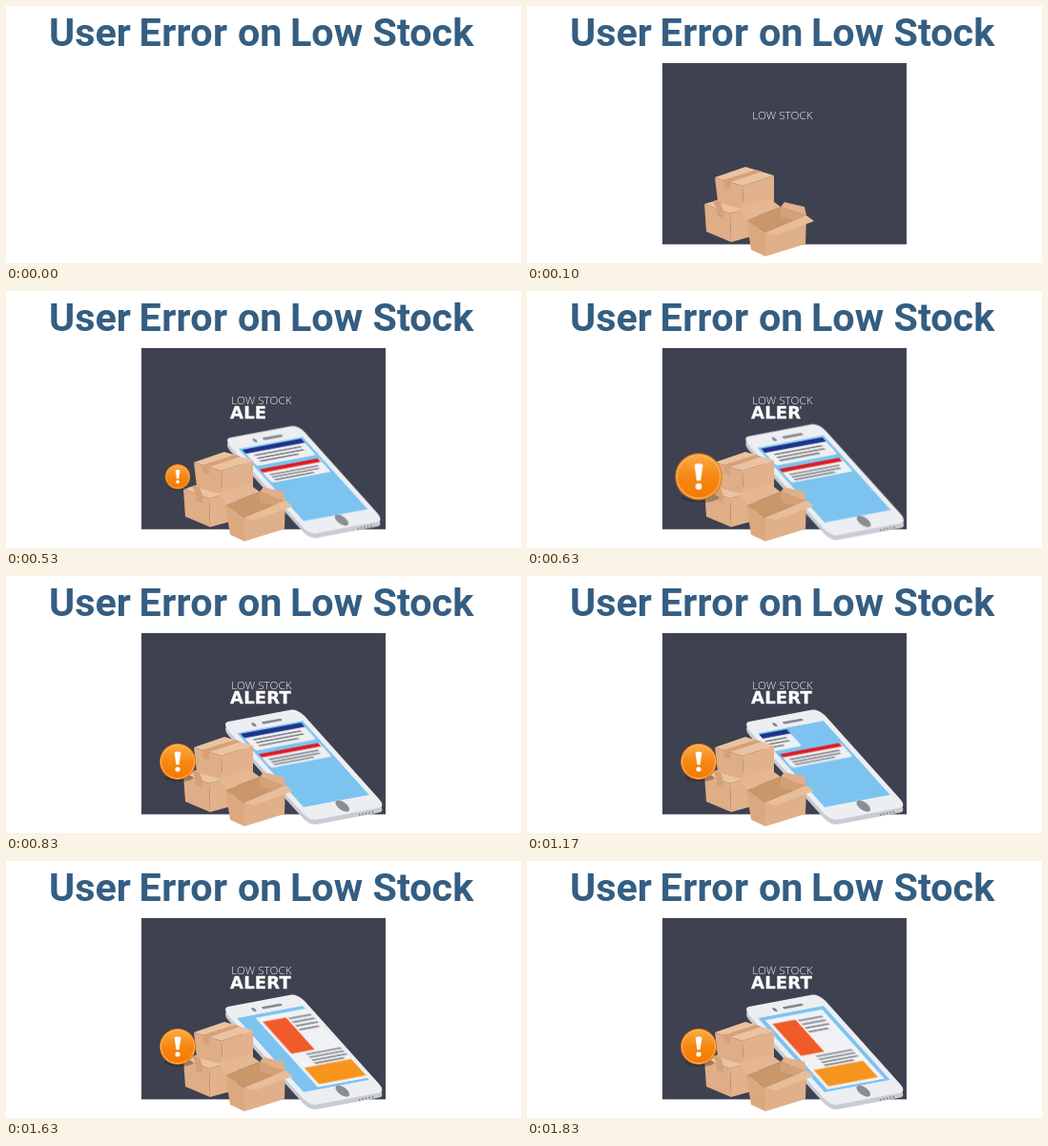
An HTML page that plays this animation: 540x270 px, repeating every 1.87 s.

```html
<!DOCTYPE html>
<html lang="en">
<head>
<meta charset="utf-8">
<title>User Error on Low Stock</title>
<style>
  html, body { margin: 0; width: 100%; height: 100%; overflow: hidden; background: #fff; }
  svg { display: block; width: 540px; height: 270px; }
  .title { font: 700 41.3px Roboto, "Open Sans", sans-serif; fill: #345e82; }
  .small { font: 300 11.7px "Open Sans", sans-serif; fill: #f0f0f4; }
  .alert { font: 700 18px "DejaVu Sans", sans-serif; fill: #fff; stroke: #fff; stroke-width: .3px; }

  .scene, .cover, .phone, .badge, .first, .second, .drop, .page {
    animation: 1870ms linear infinite;
  }
  .scene { animation-name: show; animation-timing-function: step-end; }
  .cover { animation-name: type; animation-timing-function: step-end; }
  .phone { animation-name: pop; transform-origin: 312px 198px; }
  .badge { animation-name: bounce; transform-origin: 180px 195px; }
  .first { animation-name: leave-first; }
  .second { animation-name: leave-second; }
  .drop { animation-name: drop; }
  .page { animation-name: enter; }

  @keyframes show {
    0% { visibility: hidden; }
    5.348%, 100% { visibility: visible; }
  }
  @keyframes type {
    0% { transform: translateX(0); }
    17.647% { transform: translateX(16px); }
    22.46% { transform: translateX(27.4px); }
    26.738% { transform: translateX(40px); }
    31.016% { transform: translateX(53.4px); }
    35.294%, 100% { transform: translateX(68px); }
  }
  @keyframes pop {
    0%, 14.439% { transform: scale(0); animation-timing-function: ease-out; }
    19.786% { transform: scale(1.18); }
    21.39% { transform: scale(1.19); animation-timing-function: ease-in-out; }
    28.342% { transform: scale(.977); animation-timing-function: ease-in-out; }
    34.225% { transform: scale(1.01); }
    41.176%, 100% { transform: scale(1); }
  }
  @keyframes bounce {
    0%, 25.134% { transform: scale(0); }
    28.342% { transform: scale(.68); animation-timing-function: ease-out; }
    33.69% { transform: scale(1.3); animation-timing-function: ease-in-out; }
    37.433% { transform: scale(.95); }
    41.176%, 100% { transform: scale(1); }
  }
  @keyframes drop {
    0%, 18.182% { transform: translateY(-27px); }
    19.786% { transform: translateY(-15px); }
    22.995%, 100% { transform: translateY(0); }
  }
  @keyframes leave-first {
    0%, 55.08% { transform: translateX(0); animation-timing-function: ease-in-out; }
    69.519%, 100% { transform: translateX(-100px); }
  }
  @keyframes leave-second {
    0%, 65.775% { transform: translateX(0); animation-timing-function: ease-in-out; }
    83.422%, 100% { transform: translateX(-100px); }
  }
  @keyframes enter {
    0%, 71.123% { transform: translateX(100px); animation-timing-function: cubic-bezier(.2, .4, .6, 1); }
    97.861%, 100% { transform: translateX(0); }
  }
</style>
</head>
<body>
<svg viewBox="0 0 540 270">
  <defs>
    <clipPath id="stage"><rect x="142" y="60" width="256" height="210"/></clipPath>
    <clipPath id="screen"><rect width="100" height="100"/></clipPath>
    <linearGradient id="orange" x2="0" y2="1">
      <stop offset="0" stop-color="#fbab45"/>
      <stop offset=".5" stop-color="#f68712"/>
      <stop offset="1" stop-color="#f47a00"/>
    </linearGradient>
  </defs>

  <text class="title" y="42"><tspan x="45">User</tspan> <tspan x="139.5" letter-spacing=".4">Error</tspan> <tspan x="243">on</tspan> <tspan x="298">Low</tspan> <tspan x="384.5">Stock</tspan></text>

  <g class="scene" clip-path="url(#stage)">
    <rect x="142" y="60" width="256" height="190.4" fill="#3e414f"/>
    <text class="small" x="236.2" y="119">LOW STOCK</text>
    <text class="alert" x="235" y="134" letter-spacing=".2">ALERT</text>
    <rect class="cover" x="234" y="120" width="68" height="16" fill="#3e414f"/>

    <g class="phone">
      <!-- phone face: the screen is the square 0..100 -->
      <g transform="matrix(.69 -.13 .7 .78 242 170)">
        <rect x="-8" y="-15" width="116" height="132" rx="10" fill="#c9ccd3"/>
      </g>
      <path d="M370 251L387 247.3" stroke="#82858e" stroke-width="2" stroke-dasharray="1.5 2"/>
      <g transform="matrix(.69 -.13 .7 .78 242 165)">
        <rect x="-8" y="-15" width="116" height="132" rx="10" fill="#eceef2"/>
        <circle cx="32" cy="-6" r="2.6" fill="#85878f"/>
        <path d="M46 -6H73" stroke="#85878f" stroke-width="3" stroke-linecap="round"/>
        <circle cx="52" cy="107" r="7.5" fill="#8b8d94"/>
        <g clip-path="url(#screen)">
          <rect width="100" height="100" fill="#7cc3f0"/>
          <g class="second">
            <g class="drop">
              <rect x="4" y="29" width="92" height="18.5" rx="3" fill="#eef0f3"/>
              <rect x="4" y="29" width="90" height="4.5" fill="#e0191f"/>
              <path d="M11 37.5H86M11 41H84M11 44.5H72" stroke="#77797f" stroke-width="1.6"/>
            </g>
          </g>
          <g class="first">
            <rect x="4" y="2" width="92" height="22.5" rx="3" fill="#eef0f3"/>
            <rect x="4" y="2" width="92" height="5.5" fill="#20328a"/>
            <path d="M14 11.5H86M14 15.5H86M14 19.5H74" stroke="#77797f" stroke-width="1.7"/>
          </g>
          <g class="page">
            <rect x="7" y="4" width="86" height="93" fill="#f1f2f5"/>
            <rect x="12" y="10" width="35" height="43" fill="#f15a29"/>
            <path d="M50 12H86M50 17H86M50 22H86M50 27H80M31 57H86M31 61H86M31 65H86M31 69H76" stroke="#8a8c93" stroke-width="2"/>
            <rect x="12" y="72" width="75" height="22" fill="#f7941d"/>
          </g>
        </g>
      </g>
    </g>

    <!-- lower box -->
    <path d="M186 208L206 202L243 209L213 218Z" fill="#ebc3a1"/>
    <path d="M186 208L213 218L214 248L188 237Z" fill="#dfad86"/>
    <path d="M213 218L243 209V240L214 248Z" fill="#e2b28c"/>
    <path d="M195 205L202 203.5L206 215V223L199 220V213Z" fill="#d6a179"/>
    <!-- upper box -->
    <path d="M197 180L229 169L259 178L226 189Z" fill="#ebc3a1"/>
    <path d="M197 180L226 189L227 214L200 206Z" fill="#dfad86"/>
    <path d="M226 189L259 178V206L227 214Z" fill="#e2b28c"/>
    <path d="M206 182.8L240 172L246 174L213 185V193L207 191Z" fill="#d6a179"/>
    <!-- open box -->
    <path d="M230 225L266 211L293 220L250 238Z" fill="#c9976a"/>
    <path d="M266 211L293 220L281 225L266 222Z" fill="#d2a176"/>
    <path d="M230 225L223 212L255 203L266 211Z" fill="#e5b792"/>
    <path d="M266 211L270 206L291 211L293 220Z" fill="#e0b08a"/>
    <path d="M230 225L250 238V263L235 256Z" fill="#dba880"/>
    <path d="M250 238L293 220L292 250L250 263Z" fill="#e0b08a"/>
    <path d="M250 238L293 220L301 226L260 241Z" fill="#e8bd99"/>

    <g class="badge">
      <ellipse cx="181" cy="212" rx="15" ry="4" fill="#20222c" opacity=".35"/>
      <circle cx="180" cy="195" r="19" fill="#e36f08"/>
      <circle cx="180" cy="195" r="17.6" fill="url(#orange)" stroke="#fbc27a" stroke-width=".9"/>
      <path d="M176.6 185.5Q180 183.5 183.4 185.5L181.6 198.3H178.4Z" fill="#fff"/>
      <circle cx="180" cy="203" r="2.6" fill="#fff"/>
    </g>
  </g>
</svg>
</body>
</html>
```
